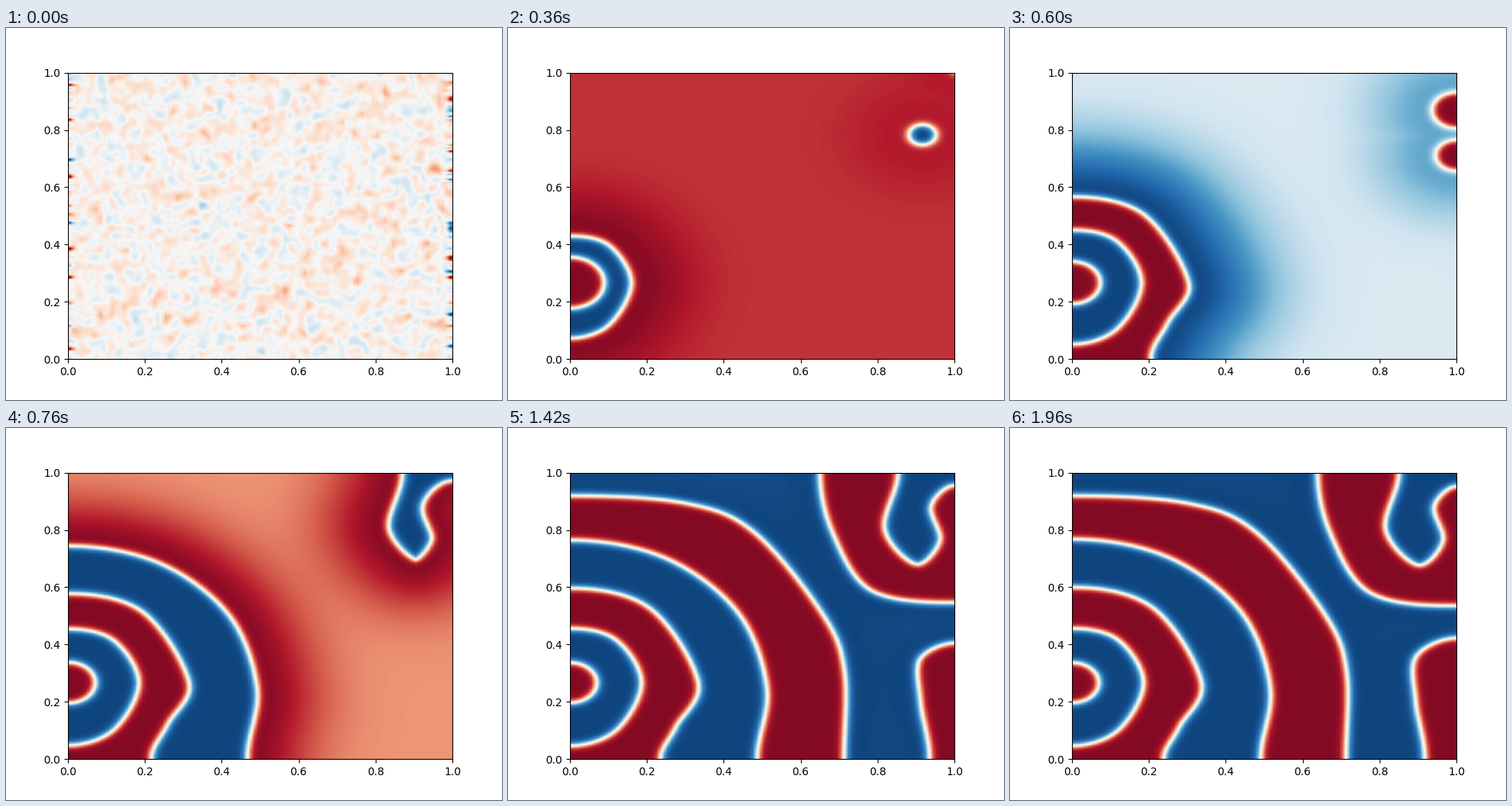
Recreate the animation shown at these times as a matplotlib script. Size 640x480 px, loop 3980 ms.

```python
import numpy as np
import matplotlib.pyplot as plt
from matplotlib.animation import FuncAnimation
from matplotlib.path import Path

N = 100          # grid cells per side
STEP = 20        # ms per frame
MOVING = 99      # frames until the pattern rests
TOTAL = 199
START = 257      # first strong swing of the background, ms
HALF = 175       # half period of the background, ms
SHARP = 0.012    # half width of a front

axis = (np.arange(N) + 0.5) / N
X, Y = np.meshgrid(axis, axis)
CELLS = np.column_stack([X.ravel(), Y.ravel()])


def ease(t, start, end):
    p = np.clip((t - start) / (end - start), 0, 1)
    return p * p * (3 - 2 * p)


def birth(k):
    return START + (k - 1) * HALF if k else 0


def on_side(p):
    return p[0] in (0, 1)


def mirror(p, q):
    """Reflect q across the border that holds p."""
    if on_side(p):
        return 2 * p[0] - q[0], q[1]
    return q[0], 2 * p[1] - q[1]


def beyond(p):
    """Carry a border point straight out of the domain."""
    if on_side(p):
        return 3 * p[0] - 1, p[1]
    return p[0], 3 * p[1] - 1


def spline(points, n=10):
    """Catmull-Rom curve that meets the border at right angles."""
    p = np.array([mirror(*points[:2]), *points, mirror(*points[:-3:-1])])
    s = np.linspace(0, 1, n, endpoint=False)[:, None]
    parts = [0.5 * (2 * b + (c - a) * s + (2 * a - 5 * b + 4 * c - d) * s**2
                    + (3 * b - a - 3 * c + d) * s**3)
             for a, b, c, d in zip(p, p[1:], p[2:], p[3:])]
    return np.vstack(parts + [p[-2:-1]])


def region(*points):
    """Signed distance to a front that runs from border to border."""
    a, b = beyond(points[0]), beyond(points[-1])
    corner = (a[0], b[1]) if on_side(points[0]) else (b[0], a[1])
    poly = np.vstack([a, spline(points), b, corner])
    dist = np.full(len(CELLS), 9.0)
    for p, q in zip(poly, np.roll(poly, -1, axis=0)):
        d = q - p
        s = np.clip((CELLS - p) @ d / (d @ d + 1e-12), 0, 1)
        gap = CELLS - p - s[:, None] * d
        dist = np.minimum(dist, np.hypot(gap[:, 0], gap[:, 1]))
    inside = Path(poly).contains_points(CELLS)
    return np.where(inside, -dist, dist).reshape(N, N)


def disc(x, y, r):
    return np.hypot(X - x, Y - y) - r


# name: (resting shape, birth stage, inset at birth, settling time in ms)
FRONTS = {
    "core": (disc(0, .266, .07), 1, -.038, 150),
    "ring1": (region((0, .455), (.12, .415), (.186, .265), (.12, .1),
                     (0, .046)), 1, .052, 150),
    "ring2": (region((0, .6), (.21, .53), (.338, .27), (.28, .11),
                     (.24, 0)), 2, .052, 400),
    "ring3": (region((0, .768), (.25, .705), (.44, .515), (.517, .25),
                     (.492, 0)), 3, .037, 400),
    "ring4": (region((0, .918), (.3, .892), (.48, .79), (.66, .5),
                     (.715, .3), (.713, 0)), 4, 0, 400),
    "spot": (disc(.917, .782, .035), 1, 0, 400),
    "speck": (disc(1, 1, 0), 1, 0, 400),
    "upper": (disc(1, .867, .063), 2, 0, 400),
    "lower": (disc(1, .71, .054), 2, 0, 400),
    "tongue": (region((.85, 1), (.815, .8), (.9, .675), (.966, .76),
                      (.943, .88), (1, .95)), 3, .03, 400),
    "bend": (region((.635, 1), (.67, .78), (.775, .575), (1, .53)),
             4, .075, 400),
    "corner": (region((.912, 0), (.888, .2), (.89, .36), (1, .428)),
               5, .075, 400),
}

RINGS = ["core", "ring1", "ring2", "ring3", "ring4"]

# fronts on the right, halo width on the left, halo strength on the right
STAGES = [
    ([], .15, 0),
    (["spot", "speck"], .17, .4),
    (["upper", "lower"], .22, .5),
    (["tongue"], .17, 1),
    (["bend", "tongue"], .2, 1),
    (["corner", "bend", "tongue"], .2, 1),
]

rng = np.random.default_rng(7)
SPECTRUM = np.fft.fft2(rng.normal(size=(N, N)))
freq = np.fft.fftfreq(N)
FREQ2 = 1.3 * freq[:, None]**2 + 0.7 * freq[None, :]**2
LEFT, RIGHT = np.clip(0.22 * rng.normal(size=(2, N, 1))**3, -1, 1)


def distance(name, t):
    shape, stage, inset, settle = FRONTS[name]
    return shape + inset * np.exp(-max(t - birth(stage), 0) / settle)


def noise(t):
    """Random grain that coarsens, then fades under the growing pattern."""
    sigma = 0.85 + t / 45
    n = np.fft.ifft2(SPECTRUM * np.exp(-2 * (np.pi * sigma)**2 * FREQ2)).real
    n *= (0.1 + 0.18 * ease(t, 0, 120)) / n.std()
    n += 0.04 * (1 - ease(t, 0, 80))
    edge = LEFT * np.exp(-(X / .014)**2) + RIGHT * np.exp(-((1 - X) / .014)**2)
    return (n + edge * np.exp(-t / 50)) * (1 - ease(t, 150, 320))


def halo(d, width):
    return np.exp(-(d / width)**2)


def stage_field(k, t):
    right, width, strength = STAGES[k]
    rings = RINGS[:k + 1]
    sign = -1 if min(k, 4) % 2 == 0 else 1
    swing = 1.15 * np.sin(np.pi * (t - START) / HALF)
    far = np.clip(swing, -0.72, 0.72) * ease(t, 0, 260)
    if k == 5:      # the background has come to rest
        far = -0.85 + 0.25 * np.exp(-(t - birth(5)) / 300)

    dist = {name: distance(name, t) for name in rings + right}
    fronts = np.prod([np.tanh(d / SHARP) for d in dist.values()], axis=0)
    outside = np.min(list(dist.values()), axis=0) > 0
    calm = 1 - halo(dist[rings[-1]], width) * (ease(t, 40, 250) if k == 0 else 1)
    if right:
        near = np.min([dist[name] for name in right], axis=0)
        calm = calm * (1 - strength * halo(near, 0.18))
    level = 0.92 * (1 - calm) + sign * far * calm
    if k == 0:      # the first core is still forming
        fronts = 1 + (fronts - 1) * ease(t, 40, 250)
    return sign * fronts * np.where(outside, level, 0.92 if k else level)


def field(t):
    k = max(i for i in range(len(STAGES)) if t >= birth(i))
    u = stage_field(k, t)
    mix = ease(t, birth(k), birth(k) + 80)
    if k and mix < 1:
        u = stage_field(k - 1, t) * (1 - mix) + u * mix
    return u + noise(t)


fig, ax = plt.subplots(figsize=(6.4, 4.8), dpi=100)
image = ax.imshow(field(0), cmap="RdBu_r", vmin=-1, vmax=1, origin="lower",
                  extent=(0, 1, 0, 1), aspect="auto", interpolation="bilinear")


def update(i):
    image.set_data(field(min(i, MOVING - 1) * STEP))
    return [image]


anim = FuncAnimation(fig, update, frames=TOTAL, interval=STEP,
                     repeat=True, repeat_delay=0)
plt.show()
```
